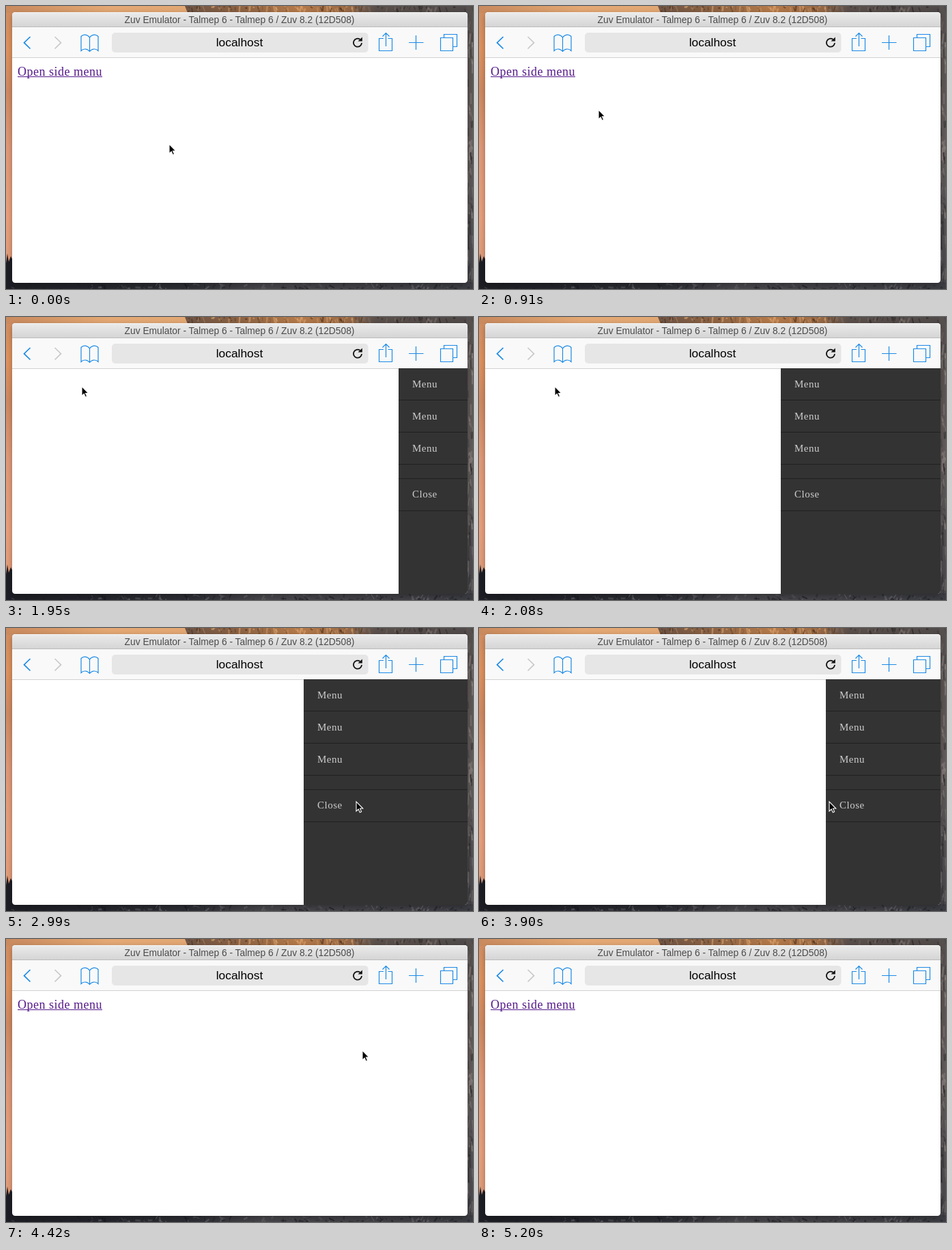
An HTML page that plays this animation: 684x414 px, repeating every 5.33 s.

```html
<!DOCTYPE html>
<html lang="en">
<head>
<meta charset="utf-8">
<title>Side menu</title>
<style>
  html, body { margin: 0; width: 100%; height: 100%; overflow: hidden; }
  svg { display: block; }
  .sans { font-family: "Liberation Sans", Arial, sans-serif; text-anchor: middle; }
  .serif { font-family: "Liberation Serif", Times, serif; letter-spacing: .5px; }
  .icon { fill: none; stroke: #1c8ae6; stroke-width: 1.2; }
</style>
</head>
<body>
<svg width="684" height="414" viewBox="0 0 684 414">
  <defs>
    <linearGradient id="sky" x2="0" y2="1">
      <stop stop-color="#cf8d62"/><stop offset=".15" stop-color="#e0935f"/>
      <stop offset=".3" stop-color="#d08a62"/><stop offset=".5" stop-color="#e09a78"/>
      <stop offset=".75" stop-color="#e8a07c"/><stop offset="1" stop-color="#dc9a78"/>
    </linearGradient>
    <linearGradient id="glow">
      <stop stop-color="#c98a5e"/><stop offset=".5" stop-color="#e3a873"/><stop offset="1" stop-color="#e2a874"/>
    </linearGradient>
    <linearGradient id="cliff">
      <stop stop-color="#6e5445"/><stop offset=".18" stop-color="#8a6244"/>
      <stop offset=".4" stop-color="#b57a4a"/><stop offset=".56" stop-color="#9a6a45"/>
      <stop offset=".66" stop-color="#5a4f4a"/><stop offset="1" stop-color="#4f4a4a"/>
    </linearGradient>
    <linearGradient id="side" x2="0" y2="1">
      <stop stop-color="#55504e"/><stop offset=".5" stop-color="#625c5b"/><stop offset="1" stop-color="#47464b"/>
    </linearGradient>
    <linearGradient id="ground">
      <stop stop-color="#1d1e25"/><stop offset=".4" stop-color="#2e2f36"/>
      <stop offset=".55" stop-color="#48474b"/><stop offset="1" stop-color="#3c3d43"/>
    </linearGradient>
    <linearGradient id="bar" x2="0" y2="1">
      <stop stop-color="#ebebeb"/><stop offset="1" stop-color="#d4d4d4"/>
    </linearGradient>
    <clipPath id="frame"><rect x="9" y="9" width="667" height="396" rx="4.5"/></clipPath>
    <clipPath id="page"><rect x="9" y="75" width="667" height="330"/></clipPath>
    <filter id="blur" x="-5%" y="-5%" width="110%" height="115%"><feGaussianBlur stdDeviation="4"/></filter>
  </defs>

  <rect width="684" height="414" fill="url(#sky)"/>
  <rect width="300" height="10" fill="url(#glow)"/>
  <path d="M262 0H684V10H266Z" fill="url(#cliff)"/>
  <rect x="674" width="10" height="414" fill="url(#side)"/>
  <path d="M0 376L2 362L4 374L7 366L10 372V404H684V414H0Z" fill="url(#ground)"/>
  <g id="grain"></g>
  <rect x="9" y="12" width="667" height="396" rx="5" opacity=".3" filter="url(#blur)"/>

  <g clip-path="url(#frame)">
    <rect x="9" y="9" width="667" height="396" fill="#fff"/>
    <rect x="9" y="9" width="667" height="22" fill="url(#bar)"/>
    <path d="M9 9.5H676" stroke="#f5f5f5"/>
    <rect x="9" y="31" width="667" height="44" fill="#f9f9f9"/>
    <path d="M9 30.5H676" stroke="#bcbcbc"/>
    <path d="M9 75.5H676" stroke="#d2d2d2"/>
    <text class="sans" x="342" y="25" font-size="13.8" fill="#4a4a4a">Zuv Emulator - Talmep 6 - Talmep 6 / Zuv 8.2 (12D508)</text>

    <rect x="155" y="39" width="375.5" height="29" rx="5" fill="#e6e6e7"/>
    <text class="sans" x="342" y="59" font-size="17.4">localhost</text>
    <g class="icon">
      <path d="M35.500 45L26.500 53.700L35.500 62.500" stroke-width="1.700"/>
      <path d="M71.500 45L80.500 53.700L71.500 62.500" stroke="#c9c9cb" stroke-width="1.700"/>
      <path d="M122.500 46C119 41 113 41 110 44.500V65.500C113 62 119 62 122.500 66.500C126 62 132 62 135 65.500V44.500C132 41 126 41 122.500 46V66"/>
      <path d="M553 47.500H546.500V65.500H565.500V47.500H559.500M556.500 59V40M551.500 44.500L556.500 39.500L561.500 44.500"/>
      <path d="M590 53.500H611.500M600.500 43V64"/>
      <path d="M636.500 46.500H654.500V65.500H636.500ZM641.500 46V41.500H660.500V59.500H655"/>
      <path d="M518.500 48.800A6 6 0 1 0 521 54" stroke="#111" stroke-width="1.800"/>
    </g>
    <path d="M521.800 45.500V51.500H515.500Z" fill="#111"/>

    <g clip-path="url(#page)">
      <g id="link">
        <text class="serif" x="17" y="102" font-size="18" fill="#551a8b">Open side menu</text>
        <path d="M17 103.500H141" stroke="#551a8b"/>
      </g>
      <g id="menu">
        <rect y="75" width="240" height="330" fill="#333"/>
        <path d="M0 121.500H240M0 168.500H240M0 215.500H240M0 236.500H240M0 283.500H240" stroke="#202020"/>
        <g class="serif" font-size="15" fill="#cdcdcd">
          <text x="20" y="103">Menu</text>
          <text x="20" y="150">Menu</text>
          <text x="20" y="197">Menu</text>
          <text x="20" y="264">Close</text>
        </g>
      </g>
    </g>
  </g>
  <path id="cursor" d="M0 0V14L3.200 11L5.300 15.800L7.600 14.800L5.500 10H9.800Z" stroke="#fff" stroke-width="1.100"/>
</svg>
<script>
  const LOOP = 5330, STEP = 130, SLIDE = 300, WIDTH = 240;
  const $ = id => document.getElementById(id);
  const clamp = v => Math.min(1, Math.max(0, v));

  // Streaks on the cliff and the ground.
  let seed = 7;
  const rand = () => (seed = seed * 16807 % 2147483647) / 2147483647;
  function streaks(count, [x, y, w, h], [dx, dy], dark, light) {
    let out = '';
    for (let i = 0; i < count; i++) {
      out += `<path d="M${x + rand() * w} ${y + rand() * h}l${dx * (rand() - .4)} ${dy * rand()}" ` +
        `stroke="${rand() < .5 ? dark : light}" stroke-width="${1 + rand() * 2}" opacity="${.2 + rand() * .35}"/>`;
    }
    return out;
  }
  $('grain').innerHTML =
    streaks(70, [268, -4, 250, 8], [8, 12], '#3a2416', '#e8ae76') +
    streaks(45, [510, -4, 174, 8], [8, 10], '#24211f', '#8a7f78') +
    streaks(70, [676, 0, 8, 400], [4, 20], '#262425', '#958c89') +
    streaks(110, [0, 405, 684, 8], [14, 7], '#121319', '#77767b');

  // Same curve as CSS ease-in-out, cubic-bezier(.42, 0, .58, 1).
  function ease(x) {
    x = clamp(x);
    let lo = 0, hi = 1, u = .5;
    for (let i = 0; i < 20; i++) {
      u = (lo + hi) / 2;
      const bx = 1.26 * u * (1 - u) ** 2 + 1.74 * u * u * (1 - u) + u ** 3;
      if (bx < x) lo = u; else hi = u;
    }
    return u * u * (3 - 2 * u);
  }

  // Cursor stops: [time, x, y]
  const stops = [
    [0, 239, 202], [390, 239, 202], [1430, 111, 101.5], [2210, 111, 101.5],
    [2860, 513, 254], [4160, 513, 254], [4810, 540, -20], [LOOP, 540, -20]
  ];
  function cursorAt(t) {
    const i = stops.findIndex(s => s[0] > t);
    const [t0, x0, y0] = stops[i - 1], [t1, x1, y1] = stops[i];
    const k = ease((t - t0) / (t1 - t0));
    return [x0 + (x1 - x0) * k, y0 + (y1 - y0) * k];
  }

  const move = (id, x, y) => $(id).setAttribute('transform', `translate(${x} ${y})`);

  const start = performance.now();
  function draw() {
    const t = Math.floor((performance.now() - start) % LOOP / STEP) * STEP;
    const open = ease((t - 1814) / SLIDE) - ease((t - 3786) / SLIDE);
    const shown = Math.round(WIDTH * open);
    move('menu', 676 - shown, 0);
    move('link', -2 * shown, 0);
    move('cursor', ...cursorAt(t));
    requestAnimationFrame(draw);
  }
  draw();
</script>
</body>
</html>
```
